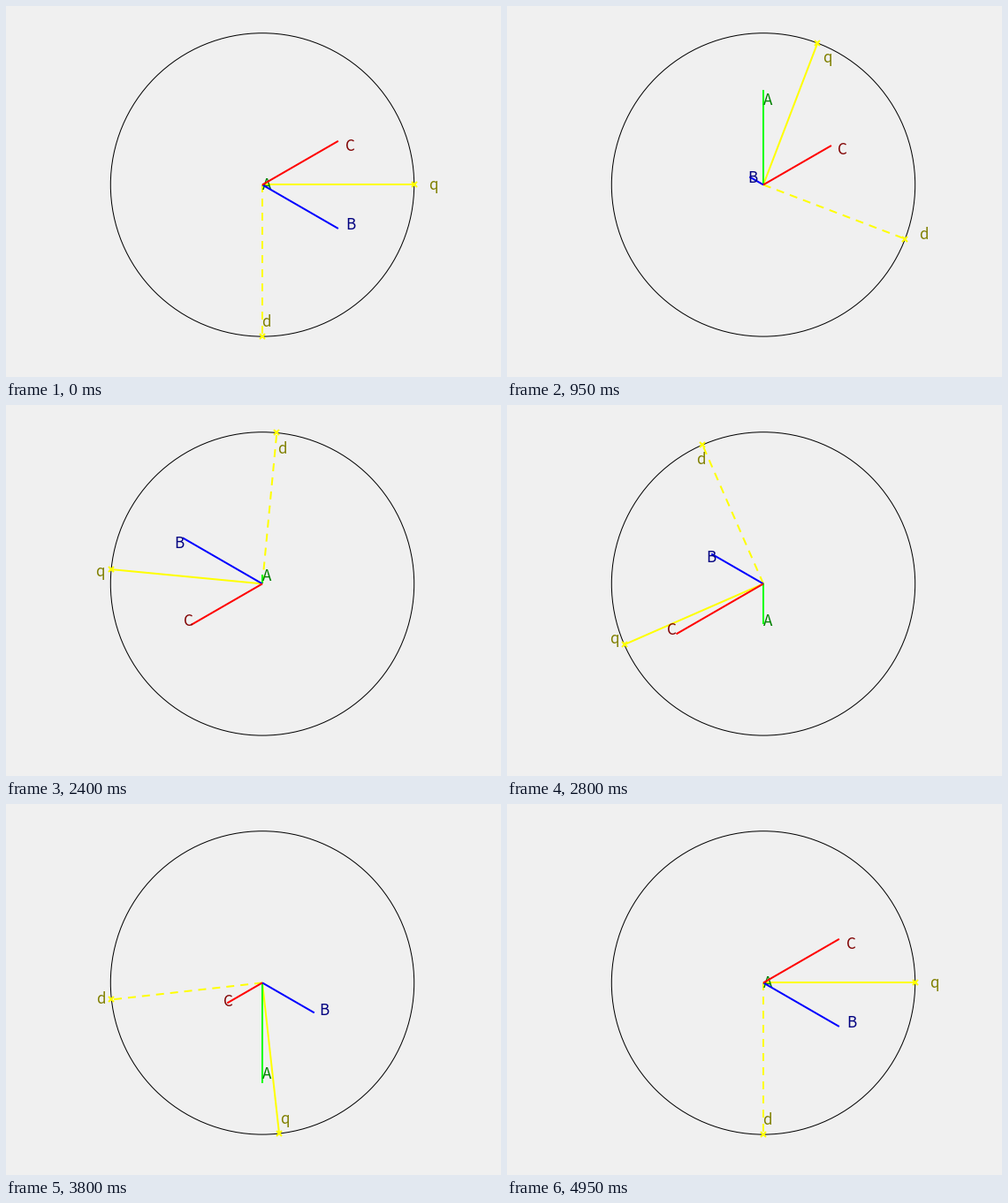
These frames come from a looping animation (560x420 px, 5 s). A matplotlib script:

```python
import numpy as np
import matplotlib.pyplot as plt
from matplotlib.animation import FuncAnimation

W, H, DPI = 560, 420, 100
FRAMES, INTERVAL = 100, 50
CX, CY, R = 290, 202.4, 171.7
AMP = R * 2 / 3
PX = 72 / DPI  # points per pixel

fig = plt.figure(figsize=(W / DPI, H / DPI), dpi=DPI, facecolor="#f0f0f0")
ax = fig.add_axes([0, 0, 1, 1])
ax.set(xlim=(0, W), ylim=(H, 0))
ax.axis("off")
ax.add_patch(plt.Circle((CX, CY), R, fill=False, ec="black", lw=PX, zorder=1))


class Vector:
    """A line from the centre with a letter near its tip."""

    def __init__(self, name, color, text_color, order, **style):
        self.line, = ax.plot([], [], color=color, lw=2 * PX, zorder=order,
                             solid_capstyle="butt", dash_capstyle="butt",
                             **style)
        self.label = ax.text(0, 0, name, color=text_color,
                             family="Noto Sans CJK JP", size=17 * PX,
                             ha="left", va="baseline", zorder=order + 0.5)

    def point(self, length, angle):
        dx, dy = length * np.cos(angle), -length * np.sin(angle)
        self.line.set_data([CX, CX + dx], [CY, CY + dy])
        self.label.set_position((CX + 1.1 * dx - 0.5, CY + 0.9 * dy + 6))


tip = dict(marker="x", markersize=6 * PX, markeredgewidth=2 * PX, markevery=[1])
q_axis = Vector("q", "#ffff00", "#808000", 2, **tip)
d_axis = Vector("d", "#ffff00", "#808000", 3, dashes=(4.5, 3.5), **tip)

# phase vector, axis direction, phase shift
phases = [
    (Vector("A", "#00ff00", "#008000", 4), np.radians(90), 0),
    (Vector("B", "#0000ff", "#000080", 5), np.radians(150), -np.pi / 3),
    (Vector("C", "#ff0000", "#800000", 6), np.radians(30), np.pi / 3),
]


def update(i):
    theta = 2 * np.pi * i / (FRAMES - 1)
    q_axis.point(R, theta)
    d_axis.point(R, theta - np.pi / 2)
    for vector, direction, shift in phases:
        vector.point(AMP * np.sin(theta + shift), direction)
    return []


anim = FuncAnimation(fig, update, frames=FRAMES, interval=INTERVAL,
                     init_func=lambda: update(0), repeat=True, repeat_delay=0)
plt.show()
```
